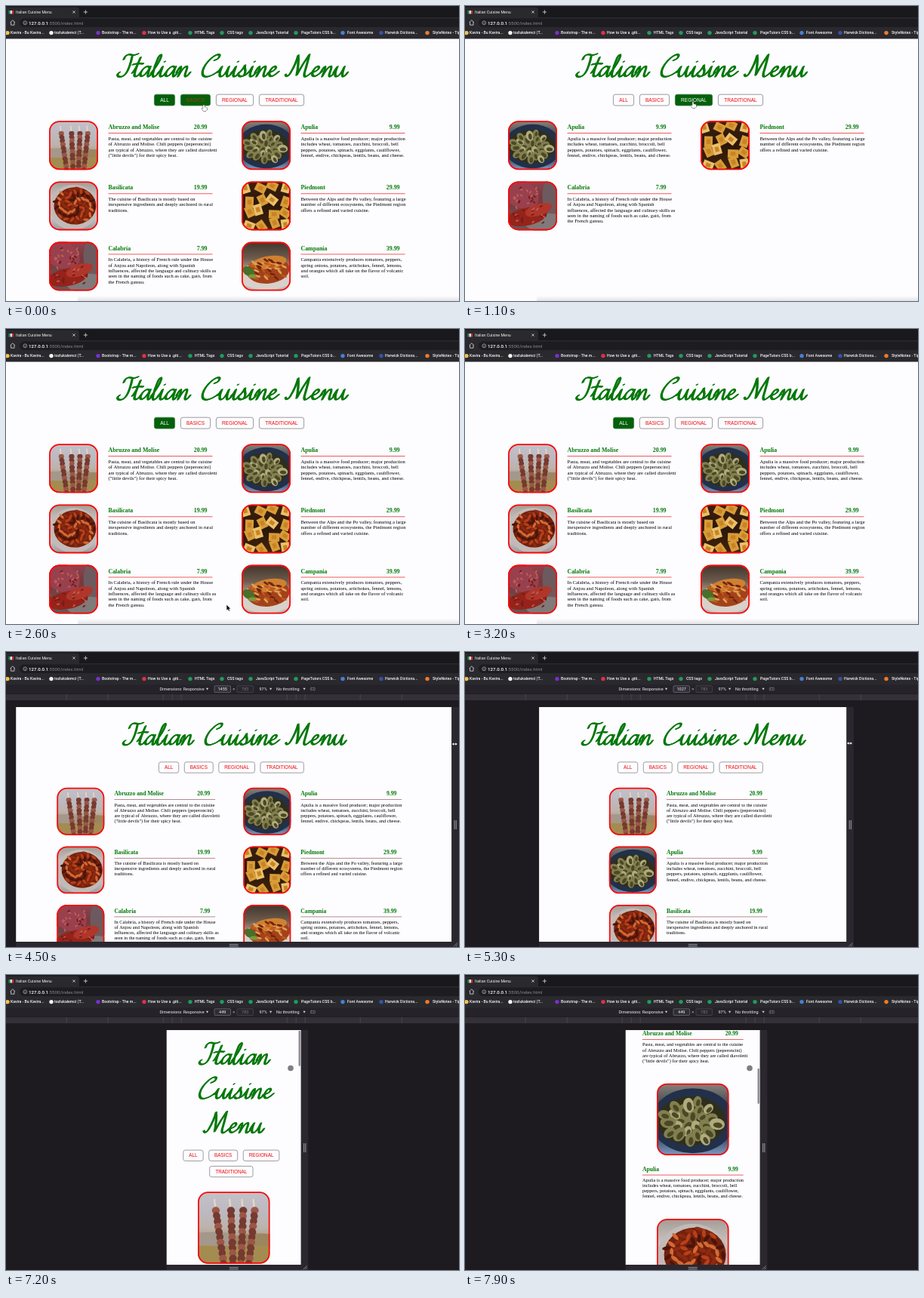
Write an HTML page with a canvas that moves like this. It is 600 px wide and 391 px high and loops after 8000 ms.

```html
<!DOCTYPE html>
<html lang="en">
<head>
<meta charset="utf-8">
<title>Italian Cuisine Menu</title>
<style>
html, body { margin: 0; width: 100%; height: 100%; overflow: hidden; background: #1d1a20; }
canvas { display: block; width: 100vw; height: 100vh; }
</style>
</head>
<body>
<canvas id="stage" role="img" aria-label="Italian Cuisine Menu"></canvas>
<script>
const W = 600, H = 391, LOOP = 8000, STEP = 100, TAU = Math.PI * 2;
const canvas = document.getElementById('stage');
const g = canvas.getContext('2d');
const SANS = 'Roboto, Inter, sans-serif';
const ARIAL = '"Liberation Sans", Arial, sans-serif';
const SERIF = '"Liberation Serif", "Times New Roman", serif';
const DEVICE_AT = 3700, CSS_PX = 0.3966, ZOOM = 0.9685, MID = 301.75;

const items = [
  ['Abruzzo and Molise', '20.99', ['Pasta, meat, and vegetables are central to the cuisine', 'of Abruzzo and Molise. Chili peppers (peperoncini)', 'are typical of Abruzzo, where they are called diavoletti', '("little devils") for their spicy heat.']],
  ['Apulia', '9.99', ['Apulia is a massive food producer; major production', 'includes wheat, tomatoes, zucchini, broccoli, bell', 'peppers, potatoes, spinach, eggplants, cauliflower,', 'fennel, endive, chickpeas, lentils, beans, and cheese.']],
  ['Basilicata', '19.99', ['The cuisine of Basilicata is mostly based on', 'inexpensive ingredients and deeply anchored in rural', 'traditions.']],
  ['Piedmont', '29.99', ['Between the Alps and the Po valley, featuring a large', 'number of different ecosystems, the Piedmont region', 'offers a refined and varied cuisine.']],
  ['Calabria', '7.99', ['In Calabria, a history of French rule under the House', 'of Anjou and Napoleon, along with Spanish', 'influences, affected the language and culinary skills as', 'seen in the naming of foods such as cake, gat\u00f2, from', 'the French gateau.']],
  ['Campania', '39.99', ['Campania extensively produces tomatoes, peppers,', 'spring onions, potatoes, artichokes, fennel, lemons,', 'and oranges which all take on the flavor of volcanic', 'soil.']]
];
const filters = [[0, 1, 2, 3, 4, 5], [0, 2, 3, 5], [1, 3, 4], [0, 4, 2]];
const buttons = [['ALL', 28], ['BASICS', 40], ['REGIONAL', 50], ['TRADITIONAL', 60]];

// Script lettering: advance and pen stroke, baseline at 0
const SPACE = 14;
const glyphs = {
  I: [18, 'M2 -24Q2 -32 9 -31Q14 -29 19 -32M12 -30Q13 -12 10 -5Q7 2 1 0Q-3 -3 1 -6'],
  t: [10, 'M0 -5Q4 -12 5.5 -27Q2.5 -8 3.5 -2Q5 1 8 -1Q9.5 -3 11 -6M-2 -17Q5 -19 11 -18'],
  a: [15, 'M11.5 -12Q9 -16 5 -13Q0 -8 1.5 -2Q4 2 8 -4Q11 -9 11.8 -14Q10 0 13 0Q15 -1 16 -6'],
  l: [9, 'M0 -5Q7 -18 7.5 -28Q6.5 -34 4 -27Q2 -16 2.5 -4Q3 1 6 0Q8.5 -2 10 -6'],
  i: [9.5, 'M0 -5Q3 -9 4 -14L3.3 -5Q3.2 0 6 0Q9 -1 10.5 -6M5 -21l.2 0'],
  n: [17, 'M0 -6Q2 -14 3.5 -14Q5 -13 3.3 0Q7 -14 11 -14.5Q13 -14 12 -6Q11.5 0 14 0Q16 -1 18 -6'],
  u: [17.5, 'M0 -6Q2 -12 3 -14Q1 0 5.5 0Q10 -1 12.3 -14Q11 0 14.5 0Q17 -1 18.5 -6'],
  s: [12.5, 'M0 -4Q5 -10 6 -16Q6 -13 8.5 -8Q10 -1 5 0Q2 0 1.5 -2M8 -1Q11 -2 13.5 -6'],
  e: [13, 'M0 -5Q9 -8 9 -12Q8 -16 4.5 -13Q1.5 -9 2 -4Q4 1 8 -1Q11 -3 14 -7'],
  C: [24, 'M15 -23Q21 -25 20 -30Q17 -33 11 -27Q3 -18 3 -8Q4 2 12 0Q19 -2 24 -8'],
  M: [30, 'M-3 -3Q0 3 3 -5Q7 -18 7 -30Q11 -18 12 -2Q16 -18 21.5 -31Q22 -16 21.5 -5Q22 1 25 0Q28 -2 31 -6']
};
for (const k in glyphs) glyphs[k][1] = new Path2D(glyphs[k][1]);

function track(t, keys) {
  let i = 1;
  if (t <= keys[0][0]) return keys[0].slice(1);
  while (i < keys.length && keys[i][0] < t) i++;
  if (i === keys.length) return keys[i - 1].slice(1);
  const a = keys[i - 1], b = keys[i], p = (t - a[0]) / (b[0] - a[0]);
  return a.slice(1).map((v, j) => v + (b[j + 1] - v) * p);
}
const ease = p => p * p * (3 - 2 * p);
const clamp = p => Math.max(0, Math.min(1, p));

function rect(x, y, w, h, c) { g.fillStyle = c; g.fillRect(x, y, w, h); }
function round(x, y, w, h, r) { g.beginPath(); g.roundRect(x, y, w, h, r); }
function blob(x, y, rx, ry, c, rot = 0) {
  g.fillStyle = c;
  g.beginPath();
  g.ellipse(x, y, rx, ry, rot, 0, TAU);
  g.fill();
}
function line(c, w, ...p) {
  g.strokeStyle = c;
  g.lineWidth = w;
  g.beginPath();
  for (let i = 0; i < p.length; i += 2) g.lineTo(p[i], p[i + 1]);
  g.stroke();
}
function text(s, x, y, size, c, font = SANS, align = 'left', weight = 400) {
  g.font = `${weight} ${size}px ${font}`;
  g.textAlign = align;
  g.fillStyle = c;
  g.fillText(s, x, y);
}
function blend(y0, y1, stops) {
  const f = g.createLinearGradient(0, y0, 0, y1);
  stops.forEach((c, i) => f.addColorStop(i / (stops.length - 1), c));
  return f;
}
const fade = (...stops) => rect(0, 0, 1, 1, blend(0, 1, stops));
function seeded(s) {
  return () => (s = (s * 16807) % 2147483647) / 2147483647;
}

// Dishes, drawn in a unit square
const dishes = [
  () => {
    fade('#c3c0c8', '#bdbac2', '#bcb3ac', '#a98f62', '#8a7646');
    blob(0.2, 0.66, 0.45, 0.1, '#a4988c');
    blob(0.85, 0.68, 0.4, 0.1, '#9c8660');
    rect(0, 0.75, 1, 0.25, '#a48c50');
    [[0.25, 0.36], [0.46, 0.49], [0.63, 0.6], [0.79, 0.71]].forEach(([top, foot], n) => {
      line('#e2d8c8', 0.025, top - 0.02, 0.1, top, 0.3);
      for (let i = 0; i < 11; i++) {
        const p = i / 10;
        blob(top + (foot - top) * p, 0.26 + p * 0.74, 0.055, 0.05, (i + n) % 3 ? '#753a30' : '#9c5646', i);
      }
    });
  },
  r => {
    fade('#8a837c', '#39404c', '#1f2c44', '#7f9bc2');
    blob(0.5, 0.52, 0.58, 0.45, '#22304a');
    blob(0.48, 0.52, 0.48, 0.34, '#2f2e1c');
    for (let i = 0; i < 26; i++) {
      const a = i * 2.4, d = Math.sqrt(i / 26) * 0.4;
      const x = 0.48 + Math.cos(a) * d, y = 0.53 + Math.sin(a) * d * 0.75, s = 0.075 + r() * 0.035;
      blob(x, y, s, s * 0.75, i % 3 ? '#827f4e' : '#b0ab7c', a);
      blob(x + 0.01, y + 0.015, s * 0.6, s * 0.35, '#4a4826', a);
    }
  },
  r => {
    fade('#a39b95', '#c9c3c0', '#d3cfd0', '#9a989d');
    blob(0.5, 0.53, 0.5, 0.46, '#c2bab7');
    blob(0.53, 0.5, 0.43, 0.38, '#74210d');
    for (let i = 0; i < 60; i++) {
      const a = i * 2.4, d = Math.sqrt(i / 60) * 0.41;
      blob(0.53 + Math.cos(a) * d, 0.49 + Math.sin(a) * d * 0.88, 0.06, 0.026,
        ['#b8401a', '#8d2a10', '#d26a34', '#4a150c'][i % 4], r() * 3);
    }
  },
  r => {
    fade('#3a2010', '#2b170a', '#40240c');
    for (let i = 0; i < 16; i++) {
      g.save();
      g.translate((i % 4 + 0.5) / 4 + (r() - 0.5) * 0.1, ((i >> 2) + 0.5) / 4 + (r() - 0.5) * 0.1);
      g.rotate(r() * 2);
      rect(-0.11, -0.085, 0.22, 0.17, i % 3 ? '#d99c38' : '#ecc06a');
      rect(-0.05, -0.04, 0.1, 0.08, '#c68426');
      g.restore();
    }
  },
  r => {
    fade('#8a4650', '#7a363c', '#6a4a4a', '#64595a');
    blob(0.25, 0.25, 0.4, 0.28, '#98404e', 0.5);
    blob(0.9, 0.3, 0.2, 0.4, '#6d5a5e');
    blob(0.8, 0.85, 0.45, 0.2, '#807a7a');
    blob(0.38, 0.72, 0.42, 0.18, '#96231a', -0.2);
    blob(0.62, 0.58, 0.28, 0.12, '#b0362a', -0.3);
    for (let i = 0; i < 50; i++)
      blob(r() * 0.8, 0.1 + r() * 0.75, 0.035, 0.015, i % 2 ? '#741a1a' : '#c06058', r() * 3);
  },
  r => {
    fade('#40352c', '#6d5b4c', '#c4b8ae', '#bdb6b4');
    blob(0.5, 0.7, 0.58, 0.28, '#d8d0ca');
    blob(0.54, 0.58, 0.44, 0.27, '#a3421a', -0.1);
    blob(0.56, 0.42, 0.36, 0.13, '#d08030', -0.15);
    for (let i = 0; i < 36; i++)
      blob(0.18 + r() * 0.7, 0.36 + r() * 0.4, 0.06, 0.022, ['#c2581d', '#74240e', '#dda055'][i % 3], r());
    blob(0.14, 0.6, 0.13, 0.09, '#47702a', 0.5);
    blob(0.22, 0.7, 0.08, 0.04, '#7a9a3c');
  }
];

function photo(n, x, y, size) {
  g.save();
  round(x, y, size, size, 14);
  g.clip();
  g.translate(x, y);
  g.scale(size, size);
  dishes[n](seeded(91 + n * 37));
  g.restore();
  round(x + 0.9, y + 0.9, size - 1.8, size - 1.8, 13);
  g.strokeStyle = '#fa0a0a';
  g.lineWidth = 1.8;
  g.stroke();
}

const advance = s => [...s].reduce((n, c) => n + (c === ' ' ? SPACE : glyphs[c][0]), 0);

function lettering(s, base) {
  let x = -advance(s) / 2;
  g.strokeStyle = '#04780a';
  g.lineWidth = 1.7;
  g.lineCap = g.lineJoin = 'round';
  for (const c of s) {
    if (c === ' ') { x += SPACE; continue; }
    for (const nib of [-0.85, 0, 0.85]) {
      g.save();
      g.transform(1, 0, -0.25, 0.94, x + nib, base - nib * 0.5);
      g.stroke(glyphs[c][1]);
      g.restore();
    }
    x += glyphs[c][0];
  }
  g.lineCap = 'butt';
  g.lineJoin = 'miter';
}

function buttonRow(list, y, active, hover) {
  const total = list.reduce((n, i) => n + buttons[i][1] + 7, -7);
  let x = -3.5 - total / 2;
  for (const i of list) {
    const [label, w] = buttons[i], on = i === active, lit = on || i === hover;
    round(x + 0.4, y + 0.4, w - 0.8, 14.8, 2.8);
    g.fillStyle = lit ? '#04600a' : '#fdfcff';
    g.fill();
    g.strokeStyle = lit ? '#3c7a40' : '#828284';
    g.lineWidth = 0.8;
    g.stroke();
    text(label, x + w / 2, y + 10, 6.55, on ? '#fff' : lit ? '#a83a14' : '#f00808', ARIAL, 'center');
    x += w + 7;
  }
}

function card(n, x, y, stacked, rule) {
  const [name, price, copy] = items[n];
  const tx = stacked ? x : x + 78.5, top = stacked ? y + 109 : y;
  if (stacked) photo(n, x + 19.7, y, 98.5);
  else photo(n, x, y, 65);
  text(name, tx, top + 11, 7.86, '#047a08', SERIF, 'left', 700);
  text(price, tx + 131, top + 11, 7.86, '#047a08', SERIF, 'right', 700);
  rect(tx, top + 16, 138, 0.8, rule);
  copy.forEach((s, i) => text(s, tx, top + 25.6 + i * 7.35, 6.55, '#000', SERIF));
}

// Page in its own units, x measured from the centre line
function page(vw, active, hover, device) {
  const room = device ? vw * CSS_PX / ZOOM : W;
  const lines = room > 345 ? ['Italian Cuisine Menu'] : room > 225 ? ['Italian Cuisine', 'Menu'] : ['Italian', 'Cuisine', 'Menu'];
  lines.forEach((s, i) => lettering(s, 51.5 + i * 47));
  let drop = (lines.length - 1) * 47;
  if (room > 215) buttonRow([0, 1, 2, 3], 74.8 + drop, active, hover);
  else {
    buttonRow([0, 1, 2], 74.8 + drop, active, hover);
    drop += 22;
    buttonRow([3], 74.8 + drop, active, hover);
  }
  const stacked = vw < 768, cols = vw >= 1200 ? 2 : 1;
  const rule = device && !stacked ? '#a06a68' : '#ee3333';
  const shown = device ? filters[0] : filters[active];
  shown.forEach((n, i) => {
    const x = stacked ? -68.9 : cols === 2 ? -242 + i % 2 * 255 : -114.5;
    card(n, x, 110.2 + drop + Math.floor(i / cols) * (stacked ? 185.4 : 80.2), stacked, rule);
  });
}

const marks = [
  [2, '#f2c14a', 6, 'Kavira - Bu Kavira...'], [60, '#f4f4f4', 64, 'tozlukalemci (T...'],
  [122, '#7a2fd0', 127, 'Bootstrap - The m...'], [183, '#e0304a', 188, 'How to Use a .giti...'],
  [244, '#1f9c5c', 250, 'HTML Tags'], [286, '#1f9c5c', 293, 'CSS tags'],
  [324, '#1f9c5c', 331, 'JavaScript Tutorial'], [384, '#1f9c5c', 391, 'PageTutors CSS b...'],
  [446, '#4a7fd8', 452, 'Font Awesome'], [497, '#3553a8', 502, 'Harwick Dictiona...'],
  [558, '#ee7a2c', 565, 'StyleNotes - Tips']
];

function browser() {
  const bar = '#2a292e', ink = '#dcdce0';
  rect(0, 0, W, 16, '#19181c');
  rect(0, 15, W, 28.5, bar);
  round(-6, 1.5, 103, 20, 4);
  g.fillStyle = bar;
  g.fill();
  ['#1c9448', '#f0f0f0', '#d33038'].forEach((c, i) => rect(3.5 + i * 2.2, 6, 2.2, 4.4, c));
  text('Italian Cuisine Menu', 13, 10, 5.3, '#f2f2f4');
  line(ink, 0.8, 88.4, 6.4, 91.6, 9.6);
  line(ink, 0.8, 91.6, 6.4, 88.4, 9.6);
  line(ink, 0.8, 102.8, 8, 108, 8);
  line(ink, 0.8, 105.4, 5.4, 105.4, 10.6);
  round(18, 16.5, 620, 11.5, 5.7);
  g.fillStyle = '#1d1c20';
  g.fill();
  line(ink, 0.8, 5.6, 21.8, 8.8, 18.8, 12, 21.8);
  line(ink, 0.8, 6.6, 21.2, 6.6, 25.2, 11, 25.2, 11, 21.2);
  g.lineWidth = 0.6;
  g.beginPath();
  g.arc(25.3, 22.3, 2.4, 0, TAU);
  g.stroke();
  line(ink, 0.6, 25.3, 21.6, 25.3, 23.7);
  text('127.0.0.1', 30, 24.5, 6.15, '#fff', SANS, 'left', 500);
  text(':5500/index.html', 30 + g.measureText('127.0.0.1').width, 24.5, 6.15, '#8a8a90');
  marks.forEach(([x, c, tx, s]) => {
    blob(x, 35.6, 2.7, 2.7, c);
    text(s, tx, 37.4, 5.15, '#f6f6f8', SANS, 'left', 500);
  });
}

function caret(x, y) {
  g.fillStyle = '#d8d8dc';
  g.beginPath();
  g.moveTo(x, y);
  g.lineTo(x + 3.2, y);
  g.lineTo(x + 1.6, y + 2.8);
  g.fill();
}

function deviceBar(vw) {
  rect(0, 42, W, H, '#1d1a20');
  rect(0, 42.5, W, 13, '#252329');
  rect(0, 56, W, 8, '#333137');
  for (const d of [70, 82, 94, 167, 222])
    for (const s of [-1, 1]) rect(MID + s * d, 56, 0.8, 8, '#4c4a51');
  text('Dimensions: Responsive', 203.5, 51, 5.45, '#f0f0f2');
  caret(265, 47.8);
  [276, 306].forEach((x, i) => {
    round(x, 44.8, 21.5, 8.6, 1);
    g.fillStyle = i ? '#29272d' : '#2f2d34';
    g.fill();
    g.strokeStyle = i ? '#55535a' : '#85838b';
    g.lineWidth = 0.6;
    g.stroke();
  });
  text(Math.round(vw), 286.7, 51, 5.6, '#f8f8fa', SANS, 'center');
  text('\u00d7', 301.7, 51, 5.6, '#c8c8cc', SANS, 'center');
  text('783', 316.7, 51, 5.6, '#77757d', SANS, 'center');
  text('97%', 335.5, 51, 5.5, '#f0f0f2');
  caret(349, 47.8);
  text('No throttling', 358, 51, 5.5, '#f0f0f2');
  caret(393.5, 47.8);
  g.strokeStyle = '#77757d';
  g.lineWidth = 0.7;
  g.strokeRect(404.8, 47.6, 3, 3);
  g.beginPath();
  g.arc(406.3, 49.1, 3.2, -1, 1);
  g.stroke();
  g.beginPath();
  g.arc(406.3, 49.1, 3.2, 2.2, 4.2);
  g.stroke();
}

function gutters(left, right) {
  rect(right, 73, 9.5, 318, '#2a282e');
  rect(left, 384, right - left + 9.5, 7, '#2a282e');
  for (const d of [3.2, 5.4]) rect(right + d, 223, 1.2, 12, '#8b8990');
  for (const d of [0, 2.2]) rect(MID - 6, 387 + d, 12, 1.1, '#8b8990');
  line('#9a98a0', 0.8, right + 3, 390, right + 8, 385.5);
  line('#9a98a0', 0.8, right + 5.8, 390, right + 8, 388);
}

const shape = d => new Path2D(d);
const pointers = {
  arrow: shape('M0 0V7L1.7 5.5L2.8 8L3.9 7.5L2.8 5.1H5Z'),
  hand: shape('M-.8 .5Q0 -.6 .8 .5V3L4 3.6Q4.6 4 4 7L3 8.2H-.6L-2.8 4.8Q-2.6 3.8 -.8 5Z'),
  sizer: shape('M-3.4 0L-1.2 -1.8V-.6H1.2V-1.8L3.4 0L1.2 1.8V.6H-1.2V1.8Z')
};
function pointer(kind, x, y) {
  g.save();
  g.translate(x, y);
  g.lineWidth = kind === 'sizer' ? 0.6 : 0.9;
  g.strokeStyle = kind === 'arrow' ? '#fff' : '#222';
  g.fillStyle = kind === 'arrow' ? '#111' : '#fff';
  g.stroke(pointers[kind]);
  g.fill(pointers[kind]);
  g.restore();
}

function plainView(t) {
  const [x, y] = track(t, [
    [0, 262, 131], [200, 252, 127], [550, 252, 127], [950, 302, 127], [1150, 302, 127],
    [1400, 362, 127], [1550, 362, 127], [1820, 212, 127], [1900, 212, 127], [2100, 240, 141],
    [2300, 246, 160], [2650, 300, 400]
  ]);
  const active = t < 300 ? 0 : t < 1000 ? 1 : t < 1450 ? 2 : t < 1850 ? 3 : 0;
  const onRow = y > 116 && y < 133;
  const hover = onRow ? [196, 231, 278, 335].findIndex((l, i) => x >= l && x <= l + buttons[i][1]) : -1;
  rect(0, 42, W, H, '#fdfcff');
  g.save();
  g.translate(299, 42);
  page(1465, active, hover, false);
  g.restore();
  // soft shade along the lower window edge
  rect(95, 384, W, 7, blend(384, H, ['rgba(40,40,50,0)', 'rgba(40,40,50,.12)']));
  browser();
  if (t < 2650) pointer(hover < 0 ? 'arrow' : 'hand', x, y);
}

function deviceView(t) {
  const [vw] = track(t, [[4500, 1455], [5300, 1027], [5400, 983], [6300, 624], [6900, 449]]);
  const half = vw * CSS_PX / 2, left = MID - half, right = MID + half;
  const scroll = 328 * ease(clamp((t - 7150) / 700));
  deviceBar(vw);
  rect(left, 73, half * 2, 311, '#fdfcff');
  g.save();
  g.beginPath();
  g.rect(left, 73, half * 2, 311);
  g.clip();
  g.translate(MID, 73 - scroll);
  g.scale(ZOOM, ZOOM);
  page(vw, -1, -1, true);
  g.restore();
  gutters(left, right);
  if (scroll > 0) {
    round(right - 3.2, 73 + scroll * 0.155, 2.2, 47, 1.1);
    g.fillStyle = '#85838a';
    g.fill();
  }
  browser();
  if (t < 4300) {
    const [x, y] = track(t, [[3800, 500, 400], [4300, 594, 122]]);
    pointer('arrow', x, y);
  } else if (t < 6950) {
    const [y] = track(t, [[4500, 122], [5300, 121], [6300, 118]]);
    pointer('sizer', right + 4, y);
  } else {
    const [x, y] = track(t, [[6950, 393, 118], [7150, 377, 123.5]]);
    blob(x, y, 3.8, 3.8, 'rgba(105,103,110,.85)');
  }
}

function frame(now) {
  const t = Math.floor(now % LOOP / STEP + 1e-6) * STEP;
  const dpr = window.devicePixelRatio || 1;
  const w = Math.round(innerWidth * dpr), h = Math.round(innerHeight * dpr);
  if (canvas.width !== w || canvas.height !== h) {
    canvas.width = w;
    canvas.height = h;
  }
  g.setTransform(w / W, 0, 0, h / H, 0, 0);
  if (t < DEVICE_AT) plainView(t);
  else deviceView(t);
}

const start = performance.now();
function tick() {
  frame(performance.now() - start);
  requestAnimationFrame(tick);
}
tick();
</script>
</body>
</html>
```
